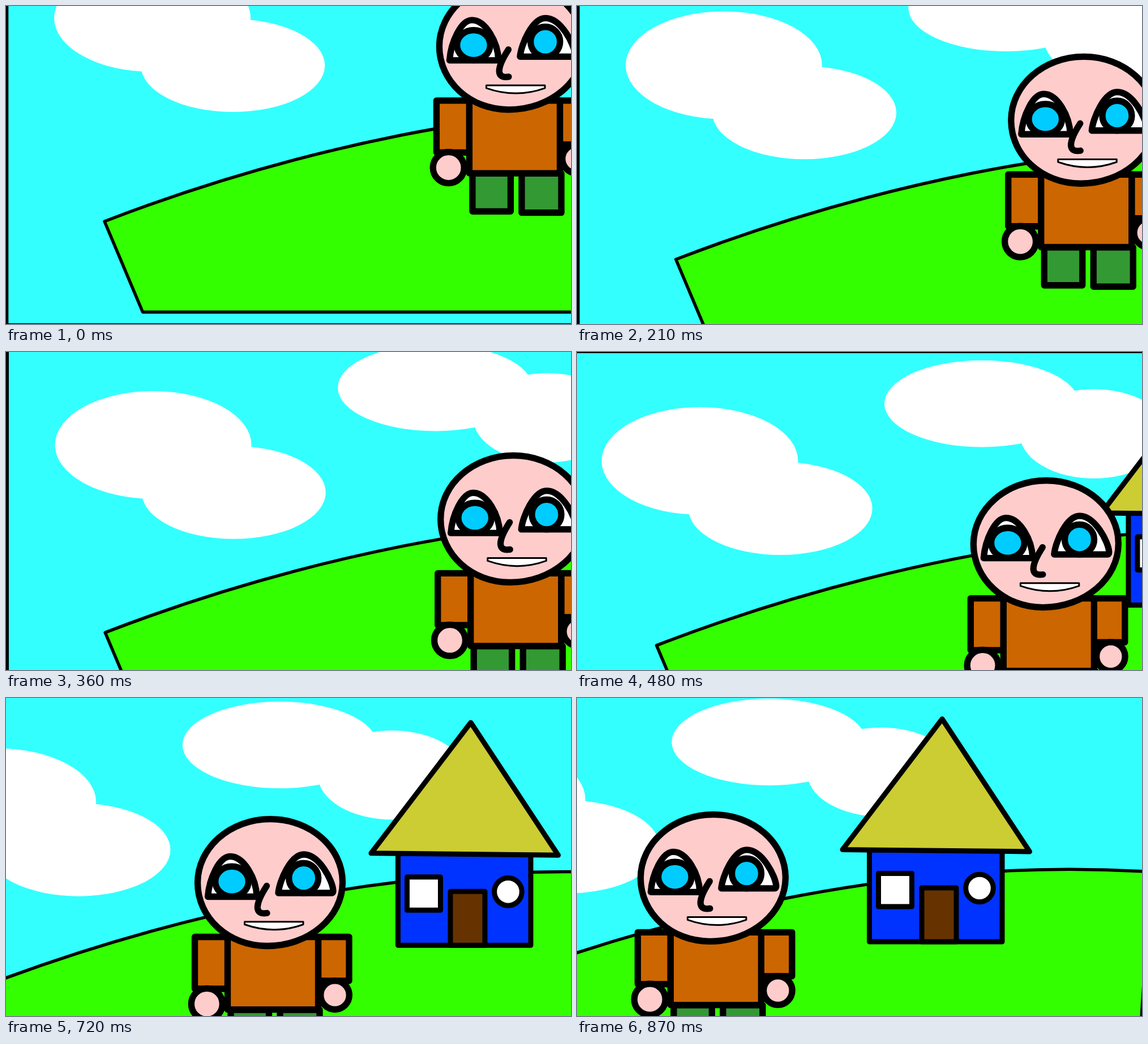
Write an HTML page that moves like this. It is 998 px wide and 561 px high and loops after 0.9 s.

```html
<!DOCTYPE html>
<html lang="en">
<head>
<meta charset="utf-8">
<title>House on the hill</title>
<style>
  html, body { margin: 0; width: 100%; height: 100%; overflow: hidden; background: #3ff; }
  svg { display: block; width: 100vw; height: 100vh; }
  .ink { stroke: #000; stroke-linejoin: round; stroke-linecap: round; }
</style>
</head>
<body>
<svg viewBox="0 0 998 561" preserveAspectRatio="none">
  <!-- data-depth: parallax factor; data-at: step at which the layer is drawn unshifted -->
  <g class="ink" data-depth="0.3" data-at="0" stroke-width="5" fill="#3ff">
    <rect x="1.8" y="-80.8" width="2400" height="643"/>
  </g>

  <g data-depth="0.639" data-at="12" fill="#fff">
    <ellipse cx="260" cy="164" rx="173.5" ry="95"/>
    <ellipse cx="402.2" cy="247.8" rx="162.5" ry="82"/>
    <ellipse cx="758" cy="63" rx="172" ry="76.5"/>
    <ellipse cx="956" cy="116" rx="131" ry="78.7"/>
  </g>

  <g class="ink" data-depth="0.514" data-at="0" stroke-width="5.5" fill="#3f0">
    <path d="M174 380Q430.8 281.1 700 227.5Q964 175.5 1206 175.5Q1278 175.5 1349.6 180L1326 540H241.5Z"/>
  </g>

  <g class="ink" data-depth="0.778" data-at="29" stroke-width="9">
    <rect x="516.5" y="268" width="234.5" height="162" fill="#03f"/>
    <path d="M645 37L469 267.5L799.5 271Z" fill="#cc3"/>
    <rect x="532.5" y="309.5" width="59" height="58.5" fill="#fff"/>
    <rect x="609" y="335" width="61" height="95" fill="#630"/>
    <circle cx="711" cy="335.5" r="24.3" fill="#fff"/>
  </g>

  <g class="ink" data-depth="1" data-at="24" stroke-width="11.3">
    <g fill="#393">
      <rect x="397" y="550" width="67.5" height="67"/>
      <rect x="484" y="550" width="70" height="69.3"/>
    </g>
    <g fill="#c60">
      <rect x="333.5" y="421.5" width="58" height="91.5"/>
      <rect x="551.5" y="421.5" width="54.5" height="77.5"/>
      <rect x="391.5" y="421.5" width="160" height="128.2"/>
    </g>
    <g fill="#fcc">
      <circle cx="354.8" cy="539.8" r="27.5"/>
      <circle cx="581" cy="524.2" r="25.3"/>
      <path d="M338.5 326C338.5 264 396 213.7 467 213.7C538 213.7 594.5 264 594.5 325C594.5 387 535 437.5 461 437.5C393 437.5 338.5 388 338.5 326Z"/>
    </g>
    <g fill="#fff">
      <path d="M356.5 350.5C359 318 377 279.5 396 279.5C420 279.5 442 318 443 350.5Z"/>
      <path d="M481 344C483 322 503 276 526 276C553 276 577 322 578 340Q578 344 575 344Z"/>
    </g>
    <g fill="#0cf">
      <ellipse cx="399" cy="323.7" rx="29.3" ry="26.5"/>
      <ellipse cx="525.7" cy="317.7" rx="26" ry="26.3"/>
    </g>
    <path d="M460.5 331.5Q444 357 444.3 370Q445 382 461 379.5" fill="none"/>
    <path d="M421.5 394.7H525V399.5Q474 418 421.5 399.5Z" fill="#fff" stroke-width="3"/>
  </g>
</svg>
<script>
  const STEP = 30, COUNT = 30, TURN = 14.5;
  const layers = [...document.querySelectorAll('[data-depth]')];

  // Camera pans up until TURN, then sweeps to the right.
  function camera(k) {
    const a = Math.min(k, TURN), b = Math.max(k - TURN, 0);
    return [0.19 * a - 45.23 * b, 18.63 * a - 1.63 * b];
  }

  function draw(ms) {
    const [x, y] = camera(Math.floor(ms / STEP) % COUNT);
    for (const layer of layers) {
      const depth = +layer.dataset.depth;
      const [x0, y0] = camera(+layer.dataset.at);
      const dx = depth * (x - x0), dy = depth * (y - y0);
      layer.setAttribute('transform', `translate(${dx.toFixed(2)} ${dy.toFixed(2)})`);
    }
  }

  const start = performance.now();
  function tick() {
    draw(performance.now() - start);
    requestAnimationFrame(tick);
  }
  tick();
</script>
</body>
</html>
```
